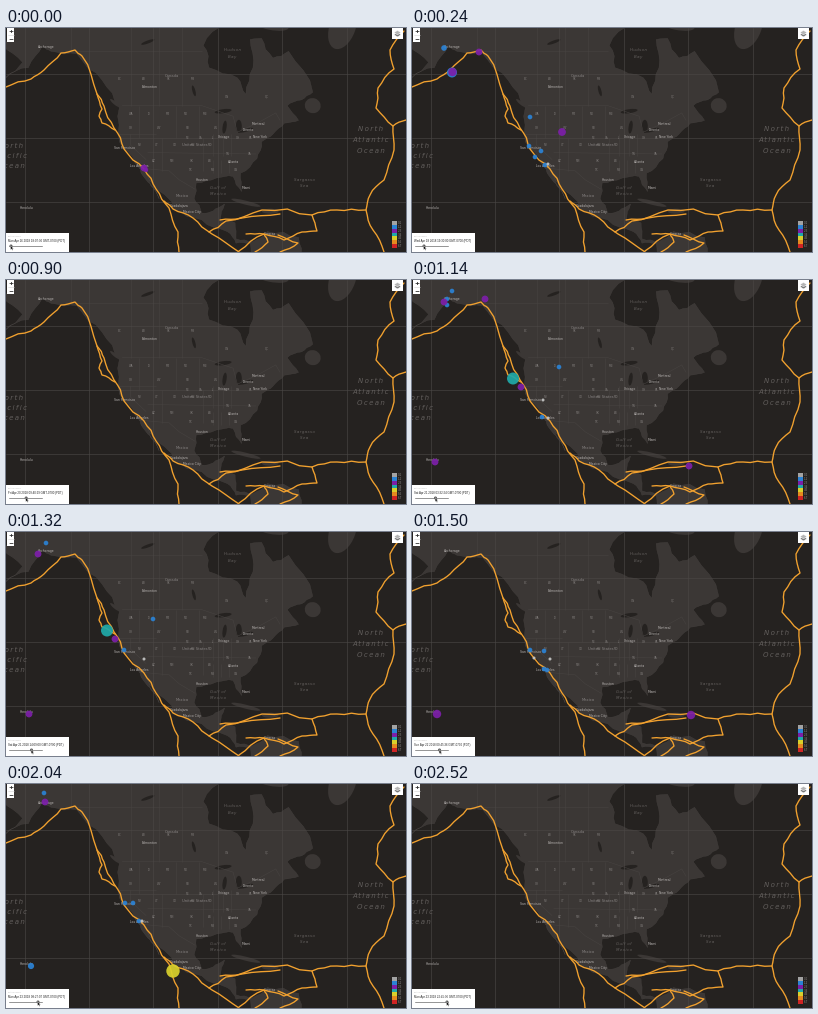
Animation of 400x224 px, one loop 2.58 s. Source, as a matplotlib script:

```python
import random

import matplotlib.pyplot as plt
import numpy as np
from matplotlib.animation import FuncAnimation
from matplotlib.patches import Circle, Ellipse, Polygon, Rectangle

W, H, DPI = 400, 224, 100
PX = 72 / DPI
FRAMES, STEP = 43, 60

OCEAN, LAND, BORDER = "#252220", "#3b3735", "#474341"
SEAM, ORANGE = "#4b4745", "#f1a12f"
GREY, BLUE, PURPLE = "#c4c4c4", "#2b82d4", "#7c1fa8"
TEAL, YELLOW = "#20a9a9", "#d9d02c"

rng = random.Random(4)
fig = plt.figure(figsize=(W / DPI, H / DPI), dpi=DPI, facecolor=OCEAN)
ax = fig.add_axes([0, 0, 1, 1])
ax.set_xlim(0, W)
ax.set_ylim(H, 0)
ax.axis("off")


def project(points):
    """Web Mercator longitude and latitude to stage pixels."""
    lon, lat = np.array(points, float).T
    y = 238 - 163 * np.log(np.tan(np.pi / 4 + np.radians(lat) / 2))
    return np.column_stack([466 + 2.844 * lon, y])


def rough(points, amount, depth=2):
    """Break up straight runs by shifting midpoints sideways."""
    for _ in range(depth):
        out = [points[0]]
        for (x0, y0), (x1, y1) in zip(points, points[1:]):
            k = rng.uniform(-amount, amount)
            out += [((x0 + x1) / 2 - k * (y1 - y0), (y0 + y1) / 2 + k * (x1 - x0)), (x1, y1)]
        points = out
    return points


def path(points, color, width, z):
    x, y = np.array(points, float).T
    ax.plot(x, y, color=color, lw=width * PX, zorder=z,
            solid_joinstyle="round", solid_capstyle="round")


def label(x, y, text, size, color, z=3, **kw):
    kw = {"ha": "center", "va": "center", "family": "DejaVu Sans", **kw}
    return ax.text(x, y, text, fontsize=size * PX, color=color, zorder=z,
                   clip_on=True, **kw)


def box(x, y, w, h, color="white"):
    ax.add_patch(Rectangle((x, y), w, h, fc=color, lw=0, zorder=8))


# Land
west = [
    (-168, 70), (-161, 64), (-165, 61), (-158, 58), (-164, 55), (-156, 57),
    (-151, 61), (-148, 60), (-139, 59.6), (-130, 54.5), (-124, 48.5), (-124, 40),
    (-118.5, 34), (-115.5, 30), (-110, 23), (-114.7, 31.5), (-105.5, 22),
    (-105, 19.5), (-95, 16), (-86, 12), (-83, 8), (-78, 8), (-77, 2),
]
south = [
    (-60, 2), (-61, 10), (-72, 12), (-77, 8.5), (-83, 9.5), (-83.3, 15),
    (-88.5, 16), (-87, 21.3), (-91, 19), (-95, 18.3), (-97.7, 23), (-97, 28),
    (-90, 29.5), (-84, 30), (-81, 25.3), (-81.4, 31), (-75.6, 35.3),
]
east = [
    (-74, 40), (-70, 42), (-66, 44.8), (-61, 45.5), (-65, 49), (-60, 50.3),
    (-56, 52), (-64.5, 60), (-70, 58.8), (-74, 62.2), (-78, 62), (-77, 57),
    (-79.5, 51.5), (-82.5, 55), (-92.5, 57), (-94.5, 61), (-87, 65), (-87, 70),
]
coast = rough([tuple(p) for p in project(west + south + east)], 0.1)
ax.add_patch(Polygon(coast, fc=LAND, ec=BORDER, lw=0.25, zorder=1))

# Islands and lakes: longitude, latitude, width, height, tilt
islands = [(-79.5, 21.7, 30, 4, 14), (-71, 18.9, 17, 5, 0), (-56, 49, 16, 15, 20),
           (-71, 64.5, 38, 12, 12), (-45.5, 64, 26, 46, 20), (-125.6, 49.6, 12, 3, 40)]
lakes = [(-87.5, 47.7, 17, 4, -8), (-87, 43.8, 4, 13, 8), (-82, 44, 6, 13, 0),
         (-79.5, 43, 15, 3, -15), (-97.8, 52.3, 3, 11, -15), (-114, 61.6, 14, 3, -20)]
for shapes, color in [(islands, LAND), (lakes, OCEAN)]:
    for lon, lat, w, h, tilt in shapes:
        ax.add_patch(Ellipse(project([(lon, lat)])[0], w, h, angle=tilt, fc=color, lw=0, zorder=1.1))

# Borders
for line in [
    [(-123, 49), (-95, 49), (-84, 46.5), (-82.5, 42.5), (-75, 45), (-69, 47.3), (-67.5, 45.5)],
    [(-117, 32.5), (-106.5, 31.7), (-103, 29), (-97.3, 26)],
    [(-141, 66), (-141, 60)], [(-139, 60), (-95, 60)],
    [(-124, 42), (-111, 42)], [(-114, 37), (-76, 36.6)], [(-120, 42), (-120, 39), (-114.6, 35)],
]:
    path(project(line), BORDER, 0.5, 1.2)
for top, bottom, meridians in [(65, 49, (-120, -110, -102)), (49, 41, (-117, -104, -96)),
                               (41, 31.5, (-109, -94.5)), (42, 36, (-91, -87.5, -84.8)),
                               (35, 31, (-91, -88.3, -85.3))]:
    for lon in meridians:
        path(project([(lon, top), (lon, bottom)]), BORDER, 0.5, 1.2)

# Map tile seams
for x in np.arange(18.5, W, 64.4):
    path([(x, 0), (x, H)], SEAM, 0.6, 1.5)
for y in (46, 110, 174):
    path([(0, y), (W, y)], SEAM, 0.6, 1.5)

# Map labels
for x, y, step, size, words in [
    (365, 101, 11, 7, ["North", "Atlantic", "Ocean"]),
    (5, 118, 10, 7, ["North", "Pacific", "Ocean"]),
    (226, 22, 7, 4, ["Hudson", "Bay"]),
    (212, 160, 6, 4, ["Gulf of", "Mexico"]),
    (298, 152, 6, 4, ["Sargasso", "Sea"]),
]:
    gap = "\u2009" if size > 5 else "\u200a"
    for i, word in enumerate(words):
        label(x, y + i * step, gap.join(word), size, "#625e5c", style="italic")
for x, y, name in [(166, 48, "Canada"), (189, 117, "United States"), (176, 168, "Mexico")]:
    label(x, y, name, 3.8, "#858180")

for x, y, name in [
    (40, 19, "Anchorage"), (144, 59.5, "Edmonton"), (119, 120, "San Francisco"),
    (133, 137.5, "Los Angeles"), (218, 109, "Chicago"), (252, 96, "Montreal"),
    (242, 102, "Toronto"), (254, 109, "New York"), (228, 134, "Atlanta"),
    (196, 152, "Houston"), (240, 160, "Miami"), (173, 177.5, "Guadalajara"),
    (186, 184.5, "Mexico City"), (21, 180, "Honolulu"), (264, 206, "Caracas"),
]:
    label(x, y, name, 3.1, "#b5b1af")

# State rows, spread evenly between two longitudes
for lat, first, last, names in [
    (54.8, -124, -98, "BC AB SK MB"), (51, -86, -72, "ON QC"),
    (47, -120, -94, "WA ID MT ND MN"), (43.5, -120, -90, "OR WY SD WI"),
    (41, -100, -78, "NE IA IL IN OH PA"), (39, -117, -92, "NV UT CO KS MO"),
    (36.5, -86, -78, "TN VA"), (34.5, -112, -92, "AZ NM OK AR"),
    (32, -99, -83, "TX MS GA"),
]:
    names = names.split()
    for lon, name in zip(np.linspace(first, last, len(names)), names):
        label(*project([(lon, lat)])[0], name, 2.8, "#7d7977")

# Plate boundaries
plates = [
    [(0, 59), (25, 51), (38, 42), (55, 25), (69, 22), (76, 28), (91, 66), (98, 78),
     (108, 100), (118, 121), (138, 141), (150, 161), (163, 180), (172, 204), (173, 224)],
    [(91, 66), (96, 81), (93, 88), (96, 95), (109, 102)],
    [(158, 173), (167, 181), (187, 190), (206, 206), (233, 224)],
    [(203, 204), (220, 193), (256, 182), (306, 187), (311, 203), (296, 204),
     (278, 212), (258, 206), (240, 206)],
    [(214, 192), (236, 190), (274, 186)],
    [(233, 223), (258, 206), (262, 214), (249, 224)],
    [(272, 207), (292, 215), (274, 224)],
    [(306, 187), (331, 182), (360, 182)],
    [(398, 3), (384, 22), (388, 41), (372, 60), (370, 80), (387, 98), (388, 122),
     (378, 152), (364, 167), (360, 182), (367, 202), (378, 224)],
    [(387, 98), (400, 92)],
]
for line in plates:
    path(rough(line, 0.07), ORANGE, 1.35, 4)

# Earthquakes by moment and magnitude colour: x, y and an unusual radius
RADIUS = {GREY: 1.5, BLUE: 2.3, PURPLE: 3.4, TEAL: 6, YELLOW: 6.7}
quakes = {
    0: {PURPLE: [(138, 140), (140, 142, 2.2)]},
    4: {BLUE: [(32, 20, 2.8), (40, 44.5, 5), (118, 89), (117, 118), (123, 129),
               (129, 123), (133, 137)],
        PURPLE: [(67, 24), (40.5, 44, 4.2), (150, 104, 3.9)], GREY: [(136, 136)]},
    10: {BLUE: [(35, 5), (44, 15), (39, 18), (46, 21), (31, 27), (148, 94),
                (190.5, 128, 3), (134, 136, 2.8)],
         PURPLE: [(37, 9.5)], YELLOW: [(2, 59)], GREY: [(120, 123)]},
    19: {BLUE: [(40, 11), (35, 19), (35, 25), (147, 87), (130, 137)],
         PURPLE: [(32, 22), (73, 19), (109, 107), (23, 182), (277, 186)],
         TEAL: [(101, 98.5)], GREY: [(131, 120), (136, 138)]},
    25: {BLUE: [(132, 119), (118, 118), (132, 137), (135, 138)],
         PURPLE: [(25, 182, 4.2), (279, 183, 4.2)], GREY: [(122, 126), (138, 127)]},
    34: {BLUE: [(38, 9), (119, 119), (127, 119), (25, 182, 3.1), (133, 137)],
         PURPLE: [(39, 18)], YELLOW: [(167, 187)], GREY: [(136, 137)]},
}
dots = []
for moment, groups in quakes.items():
    for color, spots in groups.items():
        for x, y, *r in spots:
            dot = Circle((x, y), r[0] if r else RADIUS[color], fc=color,
                         lw=0, alpha=0.93, zorder=5)
            ax.add_patch(dot)
            start = max(0, moment - rng.randint(0, 3))
            dots.append((dot, start, max(moment + 1, start + 4)))

# Zoom and layer buttons
box(1, -1, 7, 15)
path([(1.5, 7), (7.5, 7)], "#cccccc", 0.5, 9)
label(4.5, 3.2, "+", 6, "#222222", z=9, weight="bold")
label(4.5, 10.4, "\u2212", 6, "#222222", z=9, weight="bold")
box(386, -1, 11, 12)
for y, tone in [(6.7, "#777777"), (4.6, "#b5b5b5")]:
    ax.add_patch(Polygon([(388, y), (391.5, y - 2.2), (395, y), (391.5, y + 2.2)],
                         fc=tone, ec="white", lw=0.3, zorder=9))

# Magnitude legend
scale = ["#a3a3a3", BLUE, PURPLE, TEAL, YELLOW, "#e58a1f", "#cf2424"]
for i, color in enumerate(scale):
    y = 193 + 3.85 * i
    box(385.5, y, 5, 3.85, color)
    label(394, y + 2, f"{i}-{i + 1}", 2.6, "#8a8684")

# Time panel
box(0, 205, 63, 19)
label(2, 208.5, "Earthquakes", 2.2, "#c4c4c4", z=9, ha="left")
clock = label(2, 212.7, "", 2.95, "#222222", z=9, ha="left", family="Liberation Sans")
path([(3, 218), (36, 218)], "#8c8c8c", 0.9, 9)
thumb = Circle((5, 218), 1.5, fc="#555555", lw=0, zorder=10)
ax.add_patch(thumb)
arrow = np.array([(0, 0), (0, 4.2), (1, 3.3), (1.8, 4.8), (2.5, 4.4), (1.8, 3), (3, 2.9)])
cursor = Polygon(arrow, fc="#111111", ec="white", lw=0.25, zorder=11)
ax.add_patch(cursor)

KEYS = [0, 4, 10, 19, 25, 34, 42]
HOURS = [18.125, 67.5, 83.343, 123.54, 144.76, 176.452, 190.76]
THUMB = [5, 12, 16, 23.5, 27.5, 32, 35]
DAYS = ["Mon", "Tue", "Wed", "Thu", "Fri", "Sat", "Sun"]


def stamp(hours):
    day, sec = divmod(round(hours * 3600), 86400)
    time = f"{sec // 3600:02d}:{sec // 60 % 60:02d}:{sec % 60:02d}"
    return f"{DAYS[day % 7]} Apr {16 + day} 2018 {time} GMT-0700 (PDT)"


def update(i):
    for dot, start, end in dots:
        dot.set_visible(start <= i < end)
    clock.set_text(stamp(np.interp(i, KEYS, HOURS)))
    x = np.interp(i, KEYS, THUMB)
    thumb.center = (x, 218)
    cursor.set_xy(arrow + (x - 0.4, 217.6))
    return []


anim = FuncAnimation(fig, update, frames=FRAMES, interval=STEP, repeat=True, repeat_delay=0)
plt.show()
```
